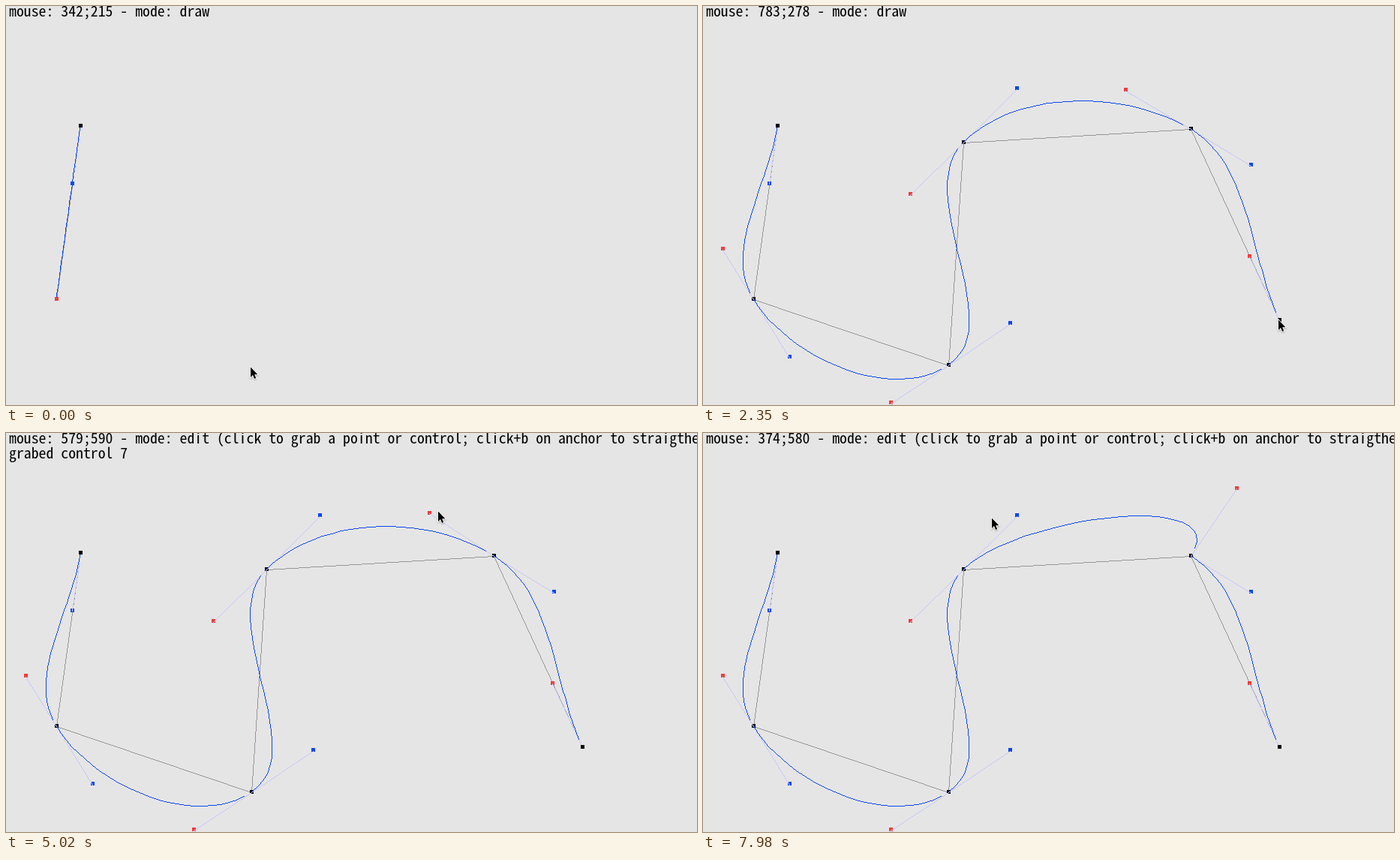
An HTML page with a canvas for the animation above (8 s loop, 921x532 px).

```html
<!DOCTYPE html>
<html lang="en">
<head>
<meta charset="utf-8">
<title>Curve editor</title>
<style>
  html, body { margin: 0; width: 100%; height: 100%; overflow: hidden; background: #e5e5e5; }
  canvas { display: block; }
</style>
</head>
<body>
<canvas id="stage" width="921" height="532"></canvas>
<script>
const ctx = document.getElementById('stage').getContext('2d');
const LOOP = 8000, TICK = 147.8;             // the picture changes once per tick
const BLUE = '#0a46f0', RED = '#f03c3c', GREY = '#969696', PALE = '#c6c6fa', INK = '#000';

const anchors = [[99, 159], [67, 390], [327, 478], [347, 181], [650, 163], [768, 418]];

// All in ticks
const CLICKS = [1, 6, 11, 16];               // each adds one anchor
const EDIT = 22, GRAB = 30, DROP = 50;
const LEAD = 0.6;                            // the pointer runs ahead of the reported mouse

const rest = [327, 481];
const glides = [
  { from: 0.7, till: 1, to: anchors[2] },
  { from: 1, till: 5, to: anchors[3] },
  { from: 7.6, till: 10, to: anchors[4] },
  { from: 11, till: 15, to: anchors[5] },
  { from: 21.6, till: 26, to: [562, 103] },
  { from: 26, till: 29, to: [563, 111] },
  { from: 29.6, till: 32, to: [564, 106] },
  { from: 34, till: 38, to: [772, 72] },
  { from: 45.6, till: 48, to: [711, 73] },
  { from: 51.6, till: 54, to: [359, 116] },
  { from: 54, till: 55, to: [400, 112] }
];

const mix = (a, b, k) => a.map((v, i) => v + (b[i] - v) * k);

function mouseAt(tick) {
  return glides.reduce((p, { from, till, to }) => {
    const u = Math.min(Math.max((tick - from) / (till - from), 0), 1);
    return mix(p, to, u * u * (3 - 2 * u));
  }, rest);
}

function unit(a, b) {
  const dx = b[0] - a[0], dy = b[1] - a[1], len = Math.hypot(dx, dy);
  return { x: dx / len, y: dy / len, len };
}

const along = (p, x, y, d) => [p[0] + x * d, p[1] + y * d];

// Handles follow the bisector of the neighbouring edges, a third of each edge long.
function handles(pts) {
  return pts.map((p, i) => {
    const a = i > 0 && unit(pts[i - 1], p);
    const b = i < pts.length - 1 && unit(p, pts[i + 1]);
    const x = (a ? a.x : 0) + (b ? b.x : 0), y = (a ? a.y : 0) + (b ? b.y : 0);
    const n = Math.hypot(x, y);
    return {
      into: a && along(p, x / n, y / n, -a.len / 3),
      out: b && along(p, x / n, y / n, b.len / 3)
    };
  });
}

const snap = ([x, y]) => [Math.floor(x), Math.ceil(y)];

// One pixel wide line without smoothing.
function line(a, b, color) {
  let [x, y] = snap(a);
  const [ex, ey] = snap(b);
  const dx = Math.abs(ex - x), dy = -Math.abs(ey - y);
  const sx = x < ex ? 1 : -1, sy = y < ey ? 1 : -1;
  let err = dx + dy;
  ctx.fillStyle = color;
  for (;;) {
    ctx.fillRect(x, y, 1, 1);
    if (x === ex && y === ey) return;
    const e2 = 2 * err;
    if (e2 >= dy) { err += dy; x += sx; }
    if (e2 <= dx) { err += dx; y += sy; }
  }
}

const guide = (a, b, color) => line([a[0], a[1] + 1], [b[0], b[1] + 1], color);

function square(p, color) {
  ctx.fillStyle = color;
  ctx.fillRect(Math.floor(p[0]) - 2, Math.floor(p[1]) - 2, 5, 5);
}

function curve(a, b, c, d) {
  const at = t => a.map((v, k) => {
    const s = 1 - t;
    return s * s * s * v + 3 * s * s * t * b[k] + 3 * s * t * t * c[k] + t * t * t * d[k];
  });
  for (let i = 0; i < 24; i++) line(at(i / 25), at((i + 1) / 25), BLUE);
}

function drawPath(pts, hs) {
  const last = pts.length - 1;
  for (let i = 0; i < last; i++) guide(pts[i], pts[i + 1], GREY);
  pts.forEach((p, i) => {
    const { into, out } = hs[i];
    square(p, INK);
    if (into) square(into, RED);
    if (out) square(out, BLUE);
    if (into) guide(p, into, PALE);
    if (out) guide(p, out, PALE);
  });
  for (let i = 0; i < last; i++) curve(pts[i], hs[i].out, hs[i + 1].into, pts[i + 1]);
  square(pts[0], INK);
  square(pts[last], last === 1 ? RED : INK);
}

const arrow = new Path2D('M0 0V13.4L3 10.6L5.1 15.4L7.2 14.5L5.2 9.8H9.4Z');

function drawPointer([x, y]) {
  ctx.save();
  ctx.translate(Math.round(x) - 1, Math.round(y) + 0.5);
  ctx.shadowColor = 'rgba(0,0,0,.3)';
  ctx.shadowBlur = 2;
  ctx.shadowOffsetY = 1;
  ctx.lineWidth = 1.8;
  ctx.strokeStyle = '#fff';
  ctx.stroke(arrow);
  ctx.shadowColor = 'transparent';
  ctx.fillStyle = INK;
  ctx.fill(arrow);
  ctx.restore();
}

function drawText(tick, [x, y]) {
  const mode = tick < EDIT ? 'draw'
    : 'edit (click to grab a point or control; click+b on anchor to straigthen)';
  ctx.font = '19.8px "Noto Sans Mono CJK JP", "Noto Sans Mono CJK SC", "Noto Sans Mono", monospace';
  ctx.fillStyle = INK;
  ctx.fillText(`mouse: ${Math.round(x) + 15};${696 - Math.round(y)} - mode: ${mode}`, 4, 14);
  if (tick >= GRAB && tick < DROP) ctx.fillText('grabed control 7', 4, 34);
}

function draw(tick) {
  const pts = anchors.slice(0, 2 + CLICKS.filter(c => c <= tick).length);
  const hs = handles(pts);
  if (pts.length === 2) hs[1].into = pts[1];
  if (tick >= GRAB) hs[4].into = mouseAt(Math.min(tick, DROP));
  ctx.fillStyle = '#e5e5e5';
  ctx.fillRect(0, 0, 921, 532);
  drawPath(pts, hs);
  drawText(tick, mouseAt(tick));
  drawPointer(mouseAt(tick + LEAD));
}

const start = performance.now();
function frame() {
  const t = (performance.now() - start) % LOOP;
  draw(Math.floor((t + 18) / TICK));
  requestAnimationFrame(frame);
}
frame();
</script>
</body>
</html>
```
